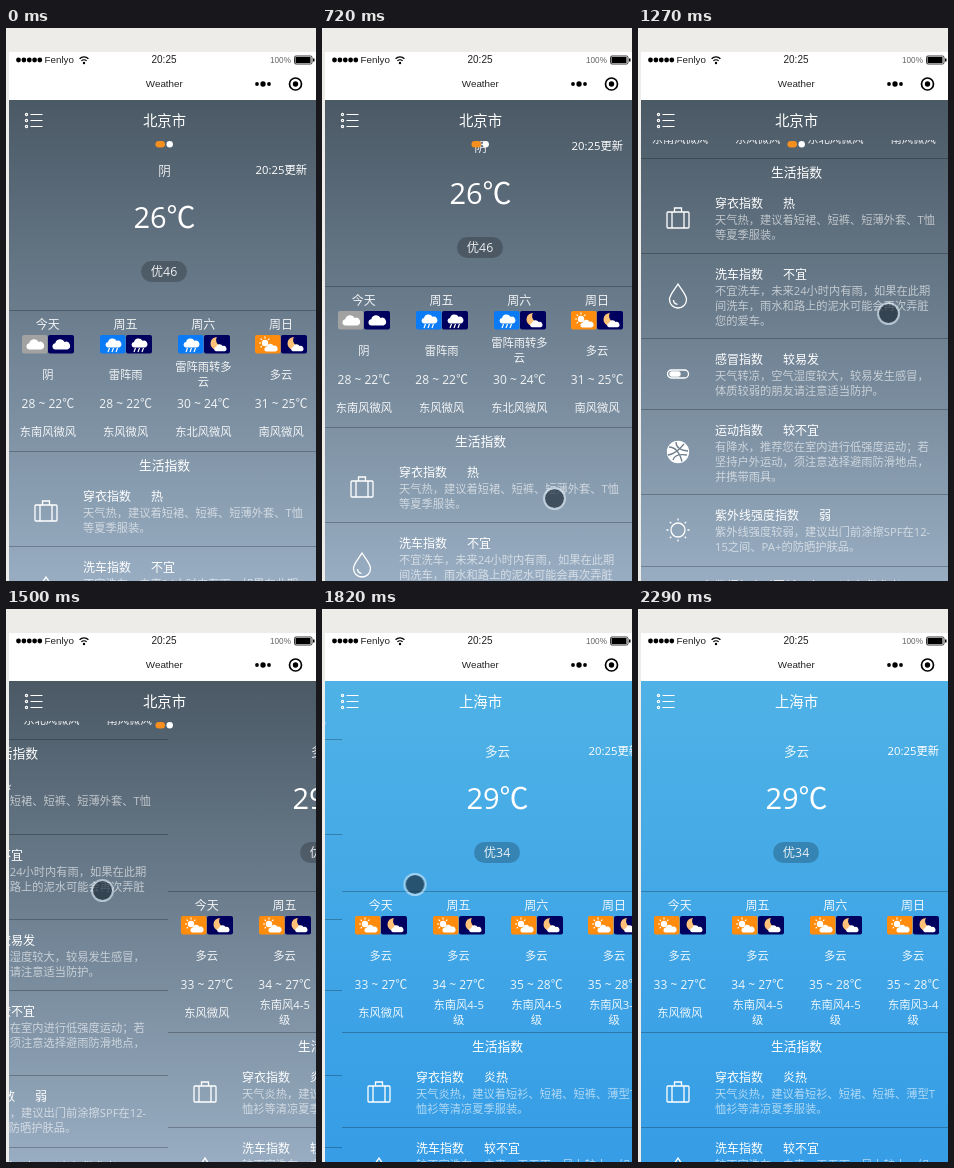
An HTML page that plays this animation: 310x553 px, repeating every 2750 ms.

```html
<!DOCTYPE html>
<html lang="zh">
<head>
<meta charset="utf-8">
<title>Weather</title>
<style>
html, body { margin: 0; width: 100%; height: 100%; overflow: hidden; background: #edece8; }
body { position: relative; color: #fff; font-family: "Open Sans", "Noto Sans CJK SC", "Noto Sans CJK", sans-serif; }
svg { display: block; overflow: visible; }
.bar, .app, .blue, .view, .page, .t, .line, .pill, .day, .item, .ptr, .top { position: absolute; }
.bar { left: 3px; top: 24px; width: 307px; height: 48px; background: #fff; }
.top { left: 0; top: 0; }
.top text { font-family: "Liberation Sans", Arial, sans-serif; fill: #222; }
.app { left: 3px; top: 72px; width: 311px; height: 481px; overflow: hidden;
  background: linear-gradient(#4b5965, #6b7d8d 44%, #98adc2); }
.blue { inset: 0; background: linear-gradient(#4fb2e6, #43a8e6 44%, #369de6); animation: show 2750ms step-end infinite; }
.head { animation: hide 2750ms step-end infinite; }
.head.next { animation-name: show; }
.view { left: 0; top: 40px; width: 311px; height: 441px; overflow: hidden; }
.track { animation: swipe 2750ms step-end infinite; }
.page { left: -3px; top: -112px; width: 314px; height: 900px; }
.page.first { animation: scroll 2750ms step-end infinite; }
.page.second { left: 308px; }
.t { white-space: nowrap; line-height: 20px; margin-top: -10px; }
.mid { left: 3px; width: 311px; text-align: center; }
.line { left: 3px; width: 311px; height: 1px; background: rgba(0,0,0,.25); }
.pill { left: 135px; top: 233px; width: 46px; height: 21px; border-radius: 11px; background: rgba(0,0,0,.22);
  font-size: 12.3px; line-height: 21px; text-align: center; color: rgba(255,255,255,.88); }
.day { top: 282px; width: 77.75px; height: 141px; text-align: center; font-size: 11.3px; color: rgba(255,255,255,.9); }
.day div { position: absolute; left: 0; width: 100%; line-height: 15px; transform: translateY(-50%); }
.day svg { position: absolute; left: 13px; top: 25px; }
.item { left: 77px; white-space: nowrap; }
.item b { display: block; font-weight: 500; font-size: 12px; line-height: 16px; }
.item b span { margin-left: 20px; }
.item p { margin: 0; font-size: 11.25px; line-height: 15px; color: rgba(255,255,255,.6); }
.page > svg { position: absolute; left: 28px; }
.ptr { left: 0; top: 0; }
.touch { animation: move 2750ms step-end infinite; }
.touch i { position: absolute; left: -11.5px; top: -11.5px; width: 19px; height: 19px; border-radius: 50%;
  border: 2px solid rgba(225,238,248,.6); background: rgba(25,38,50,.66); background-clip: padding-box; }
.arrow { visibility: hidden; left: 5px; top: 268px; animation: leave 2750ms step-end infinite; }

@keyframes show { 0% { opacity: 0 } 57.08%, 100% { opacity: 1 } }
@keyframes hide { 0% { opacity: 1 } 57.08%, 100% { opacity: 0 } }
@keyframes leave { 0% { visibility: hidden } 57.08% { visibility: visible } 59.99%, 100% { visibility: hidden } }
@keyframes scroll {
  0% { transform: none }
  26.17% { transform: translateY(-24px) }
  29.08% { transform: translateY(-184px) }
  31.63% { transform: translateY(-294px) }
  34.54%, 100% { transform: translateY(-293px) }
}
@keyframes swipe {
  0% { transform: none }
  51.63% { transform: translateX(-42px) }
  54.54% { transform: translateX(-152px) }
  57.08% { transform: translateX(-236px) }
  59.99% { transform: translateX(-261px) }
  63.26% { transform: translateX(-281px) }
  66.17% { transform: translateX(-294px) }
  68.72% { transform: translateX(-302px) }
  71.63% { transform: translateX(-307px) }
  74.54% { transform: translateX(-310px) }
  77.45%, 100% { transform: translateX(-311px) }
}
@keyframes move {
  0% { transform: translate(237px,580px) }
  2.54% { transform: translate(236px,557px) }
  5.45% { transform: translate(236px,540px) }
  8.72% { transform: translate(235px,524px) }
  11.63% { transform: translate(234px,511px) }
  14.9% { transform: translate(232px,500px) }
  17.81% { transform: translate(231px,494px) }
  26.17% { transform: translate(232px,470px) }
  29.08% { transform: translate(236px,310px) }
  31.63% { transform: translate(241px,159px) }
  34.54% { transform: translate(241px,168px) }
  37.45% { transform: translate(242px,200px) }
  40.36% { transform: translate(244px,244px) }
  43.27% { transform: translate(247px,274px) }
  46.18% { transform: translate(250px,285px) }
  51.63% { transform: translate(206px,286px) }
  54.54% { transform: translate(96px,281px) }
  57.08% { transform: translate(-40px,275px) }
  59.99% { transform: translate(30px,274px) }
  63.26% { transform: translate(60px,273px) }
  66.17% { transform: translate(92.5px,275px) }
  68.72% { transform: translate(120px,300px) }
  71.63% { transform: translate(155px,352px) }
  74.54% { transform: translate(188px,420px) }
  77.45% { transform: translate(214px,486px) }
  80.36% { transform: translate(231px,545px) }
  83.27%, 100% { transform: translate(237px,580px) }
}
</style>
</head>
<body>
<svg width="0" height="0" style="position:absolute">
  <defs>
    <path id="cloud" d="M7 14.5a3.2 3.2 0 0 1 .3-6.3A5 5 0 0 1 16.6 7A3.8 3.8 0 0 1 19.5 14.5z" fill="#fff"/>
    <g id="rain">
      <use href="#cloud" transform="translate(1.5 -.5) scale(.9)"/>
      <path d="M9.5 13l-1.5 4M13.5 13l-1.5 4M17.5 13l-1.5 4" stroke="#fff" stroke-width="1.2"/>
    </g>
    <g id="sun">
      <circle cx="10" cy="8" r="3.2" fill="#fff"/>
      <path d="M10 1.5v2M4 8h2M5.6 3.6l1.3 1.3M14.4 3.6l-1.3 1.3M5.6 12.4l1.3-1.3" stroke="#fff" stroke-width="1.2"/>
      <use href="#cloud" transform="translate(6 5.5) scale(.75)"/>
    </g>
    <g id="moon">
      <path d="M13 2a6.5 6.5 0 1 0 6 9a6 6 0 0 1-6-9z" fill="#ffc078"/>
      <use href="#cloud" transform="translate(7 6.2) scale(.7)"/>
    </g>
  </defs>
</svg>

<div class="bar"></div>
<svg class="top" width="310" height="72">
  <g fill="#000">
    <circle cx="12.5" cy="32" r="2.4"/><circle cx="17.9" cy="32" r="2.4"/><circle cx="23.3" cy="32" r="2.4"/><circle cx="28.6" cy="32" r="2.4"/><circle cx="33.8" cy="32" r="2.4"/>
    <path d="M289.5 29h15v6h-15zM307 30.5h1.5v3h-1.5z"/>
    <circle cx="251" cy="56" r="1.9"/><circle cx="257" cy="56" r="2.7"/><circle cx="263" cy="56" r="1.9"/>
    <circle cx="289.5" cy="56" r="2.7"/>
    <circle cx="78" cy="35" r="1.2"/>
  </g>
  <g fill="none" stroke="#000">
    <path d="M73.6 30.8a6.2 6.2 0 0 1 8.8 0M75.4 32.9a3.7 3.7 0 0 1 5.2 0" stroke-width="1.3"/>
    <rect x="288.5" y="28" width="17.5" height="8" rx="1.5" stroke-width=".8"/>
    <circle cx="289.5" cy="56" r="6" stroke-width="1.7"/>
  </g>
  <text x="38.5" y="35.2" font-size="9.8">Fenlyo</text>
  <text x="158" y="35.4" font-size="10" text-anchor="middle">20:25</text>
  <text x="264" y="35" font-size="8.2" style="fill:#666">100%</text>
  <text x="158.3" y="59.4" font-size="9.8" text-anchor="middle">Weather</text>
</svg>

<div class="app">
  <div class="blue"></div>
  <div class="view"><div class="track" id="track"></div></div>
  <svg class="top" width="311" height="60">
    <g fill="none" stroke="#fff" stroke-width="1.2">
      <path d="M21.5 14.5h12M21.5 20.5h12M21.5 26.5h12"/>
      <circle cx="17.5" cy="14.5" r="1.1"/><circle cx="17.5" cy="20.5" r="1.1"/><circle cx="17.5" cy="26.5" r="1.1"/>
    </g>
    <g class="head">
      <rect x="146.5" y="41" width="9.5" height="6.4" rx="3.2" fill="#f68f1e"/>
      <circle cx="160.7" cy="44.2" r="3.2" fill="#fff"/>
    </g>
  </svg>
  <div class="t head" style="left:0;width:311px;top:21px;text-align:center;font-size:14.4px">北京市</div>
  <div class="t head next" style="left:0;width:311px;top:21px;text-align:center;font-size:14.4px">上海市</div>
</div>

<div class="ptr touch"><i></i></div>
<svg class="ptr arrow" width="13" height="20">
  <path d="M.5 .5v15.5l3.6-3.3 2.5 5.8 2.3-1-2.5-5.6h4.9z" fill="#fff" stroke="#000"/>
</svg>

<script>
const GREY = '#a2a2a2', BLUE = '#0a7bf5', NAVY = '#00005e', ORANGE = '#ff8c0c';
const tops = [423, 518, 603, 674, 759, 831];

const icons = [
  '<rect x="1" y="6" width="22" height="16" rx="1"/><path d="M6 6v16M18 6v16M8.500 6V2h7v4"/>',
  '<path d="M12 0C9 5 3.500 10.500 3.500 15.500a8.500 8.500 0 0 0 17 0C20.500 10.500 15 5 12 0z"/><path d="M7.500 16a4.500 4.500 0 0 0 4 4.300"/>',
  '<rect x="1.500" y="8" width="21" height="8" rx="4"/><rect x="4" y="10" width="10" height="4" rx="1.500" fill="#fff"/>',
  '<circle cx="12" cy="12" r="10.500" fill="#fff"/><path stroke="#71808f" d="M3 7q9 0 13 14.500M10 2q0 8 12 9M2 15q8-1 16-11M7 20q2-7 14-5"/>',
  '<circle cx="12" cy="12" r="7"/><path d="' + [...Array(8)].map((_, i) => {
    const c = Math.cos(i * Math.PI / 4), s = Math.sin(i * Math.PI / 4);
    return `M${12 + 9.5 * c} ${12 + 9.5 * s}L${12 + 11.5 * c} ${12 + 11.5 * s}`;
  }).join('') + '"/>'
];

const sunny = [ORANGE, 'sun', NAVY, 'moon'];
const places = [
  {
    cls: 'first', sky: '阴', temp: 26, air: 46,
    days: [
      ['今天', [GREY, 'cloud', NAVY, 'cloud'], '阴', '28 ~ 22', '东南风微风'],
      ['周五', [BLUE, 'rain', NAVY, 'rain'], '雷阵雨', '28 ~ 22', '东风微风'],
      ['周六', [BLUE, 'rain', NAVY, 'moon'], '雷阵雨转多<br>云', '30 ~ 24', '东北风微风'],
      ['周日', sunny, '多云', '31 ~ 25', '南风微风']
    ],
    tips: [
      ['穿衣', '热', '天气热，建议着短裙、短裤、短薄外套、T恤<br>等夏季服装。'],
      ['洗车', '不宜', '不宜洗车，未来24小时内有雨，如果在此期<br>间洗车，雨水和路上的泥水可能会再次弄脏<br>您的爱车。'],
      ['感冒', '较易发', '天气转凉，空气湿度较大，较易发生感冒，<br>体质较弱的朋友请注意适当防护。'],
      ['运动', '较不宜', '有降水，推荐您在室内进行低强度运动；若<br>坚持户外运动，须注意选择避雨防滑地点，<br>并携带雨具。'],
      ['紫外线强度', '弱', '紫外线强度较弱，建议出门前涂擦SPF在12-<br>15之间、PA+的防晒护肤品。']
    ],
    foot: '天气数据每小时更新一次，以上仅供参考'
  },
  {
    cls: 'second', sky: '多云', temp: 29, air: 34,
    days: [
      ['今天', sunny, '多云', '33 ~ 27', '东风微风'],
      ['周五', sunny, '多云', '34 ~ 27', '东南风4-5<br>级'],
      ['周六', sunny, '多云', '35 ~ 28', '东南风4-5<br>级'],
      ['周日', sunny, '多云', '35 ~ 28', '东南风3-4<br>级']
    ],
    tips: [
      ['穿衣', '炎热', '天气炎热，建议着短衫、短裙、短裤、薄型T<br>恤衫等清凉夏季服装。'],
      ['洗车', '较不宜', '较不宜洗车，未来一天无雨，风力较大，如<br>果执意擦洗汽车，要做好蒙上污垢的准备。']
    ],
    foot: ''
  }
];

const mid = (y, size, text, more = '') =>
  `<div class="t mid" style="top:${y}px;font-size:${size}px;${more}">${text}</div>`;

const row = (y, text, more = '') => `<div style="top:${y}px;${more}">${text}</div>`;

const tiles = ([c1, a, c2, b]) => `<svg width="52" height="19">
  <rect width="25.500" height="18.500" rx="2" fill="${c1}"/><use href="#${a}"/>
  <rect x="26" width="26" height="18.500" rx="2" fill="${c2}"/><use href="#${b}" x="26"/></svg>`;

const day = ([name, art, sky, temp, wind], i) =>
  `<div class="day" style="left:${3 + 77.75 * i}px">${row(14, name, 'font-size:12px')}${tiles(art)}
  ${row(64, sky)}${row(93, temp + '℃', 'font-size:12px')}${row(120.5, wind)}</div>`;

const tip = ([name, level, text], i) => {
  const y = tops[i], pad = i ? 0 : 24;
  const iconY = (y + pad + tops[i + 1]) / 2 - 12;
  return `<svg width="24" height="24" style="top:${iconY}px" fill="none" stroke="#fff" stroke-width="1.3">${icons[i]}</svg>
  <div class="item" style="top:${y + pad + 13.5}px"><b>${name}指数<span>${level}</span></b><p>${text}</p></div>`;
};

const page = p => `<div class="page ${p.cls}">
  ${mid(143, 12.6, p.sky, 'color:rgba(255,255,255,.88)')}
  <div class="t" style="right:13px;top:142px;font-size:11.3px">20:25更新</div>
  ${mid(189, 29, p.temp + '℃')}
  <div class="pill">优${p.air}</div>
  ${[282, ...tops].map(y => `<div class="line" style="top:${y}px"></div>`).join('')}
  ${p.days.map(day).join('')}
  ${mid(436.5, 12.8, '生活指数')}
  ${p.tips.map(tip).join('')}
  ${mid(851, 11.6, p.foot)}
</div>`;

document.getElementById('track').innerHTML = places.map(page).join('');
</script>
</body>
</html>
```
